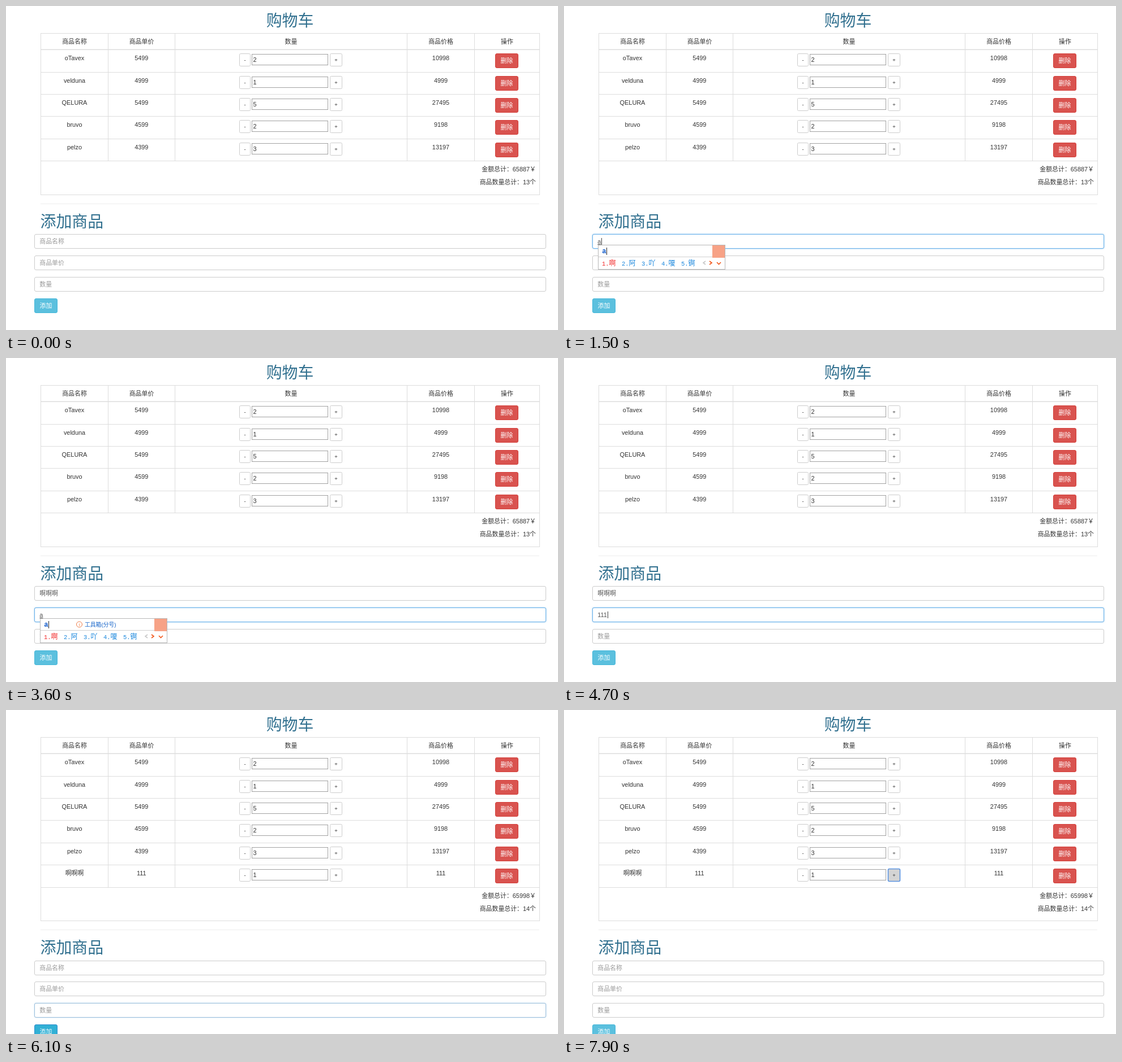
Recreate the animation shown at these times as an HTML page. Size 975 by 574 pixels, loop 8 s.

```html
<!DOCTYPE html>
<html lang="zh-CN">
<head>
<meta charset="utf-8">
<title>购物车</title>
<style>
html, body { margin: 0; width: 100%; height: 100%; overflow: hidden; background: #fff; }
svg { display: block; width: 975px; height: 574px; }
text { font-family: "Liberation Sans", "Noto Sans CJK SC", "Noto Sans CJK", sans-serif; font-size: 10.9px; fill: #333; white-space: pre; }
.colon { font-family: "Noto Sans CJK TC", "Noto Sans CJK", sans-serif; }
.glow { filter: drop-shadow(0 0 1.6px rgba(102, 175, 233, .6)); }
</style>
</head>
<body>
<svg id="stage" viewBox="0 0 975 574" xmlns="http://www.w3.org/2000/svg"></svg>
<script>
const LOOP = 8000, TOP = 77.2, ROW = 39.4;
const stage = document.getElementById('stage');
const cols = [61, 180, 298, 708, 827, 942];
const goods = [
  ['oTavex', 5499, 2], ['velduna', 4999, 1], ['QELURA', 5499, 5],
  ['bruvo', 4599, 2], ['pelzo', 4399, 3]
];
const hints = ['商品名称', '商品单价', '数量'];
const fieldY = [404.3, 442, 479.8];

// Input-method windows: right edge, letters, candidates
const one = [285, 'a', ['啊', '阿', '吖', '嗄', '锕']];
const two = [362, "a'a", ['啊啊', '嗷嗷', '阿啊', '啊', '阿']];
const three = [483, "a'a'a", ['啊啊啊', '啊啊啊啊啊啊', '啊啊啊啊', '啊啊', '啊']];
const cloud = [483, "a'a'a", ['啊啊啊', '啊啊啊啊啊啊', '啊啊啊啊啊', '啊啊啊啊', '阿阿阿']];

const start = {
  glow: [0, 0, 0], val: ['', '', ''], comp: -1, caret: null,
  pop: null, popY: 423, tip: 0, added: false, btn: '', plus: ''
};

// Time in ms and what changes then; caret is [field, x]
const steps = [
  [800, { glow: [.5, 0, 0], caret: [0, 59] }],
  [900, { glow: [1, 0, 0] }],
  [1200, { caret: null }],
  [1500, { val: ['a', '', ''], comp: 0, caret: [0, 66], pop: one }],
  [1600, { val: ["a'a", '', ''], caret: [0, 74], pop: two }],
  [1700, { val: ["a'a'a", '', ''], caret: [0, 82], pop: three }],
  [1800, { pop: cloud }],
  [2100, { val: ['啊啊啊', '', ''], comp: -1, caret: [0, 92], pop: null }],
  [2600, { caret: null }],
  [2800, { glow: [.5, .5, 0], caret: [1, 59] }],
  [2900, { glow: [0, 1, 0], val: ['啊啊啊', 'a', ''], comp: 1, caret: [1, 66], pop: one, popY: 461 }],
  [3300, { tip: .25 }],
  [3400, { tip: .5, caret: null }],
  [3500, { tip: .75 }],
  [3600, { tip: 1 }],
  [3800, { val: ['啊啊啊', '', ''], comp: -1, caret: [1, 59], pop: null, tip: 0 }],
  [4300, { caret: null }],
  [4400, { val: ['啊啊啊', '1', ''], caret: [1, 65] }],
  [4500, { val: ['啊啊啊', '11', ''], caret: [1, 71] }],
  [4700, { val: ['啊啊啊', '111', ''], caret: [1, 77] }],
  [4800, { btn: 'hover' }],
  [4900, { btn: '' }],
  [5100, { glow: [0, .5, .5], caret: [2, 59] }],
  [5200, { glow: [0, 0, 1] }],
  [5600, { val: ['啊啊啊', '111', '1'], caret: [2, 65] }],
  [5800, { btn: 'hover' }],
  [6100, { glow: [0, 0, .5], val: ['', '', ''], caret: null, added: true, btn: 'focus' }],
  [6200, { glow: [0, 0, 0] }],
  [7500, { plus: 'hover' }],
  [7900, { plus: 'focus', btn: '' }]
];

const fill = (x, y, w, h, c) => `<rect x="${x}" y="${y}" width="${w}" height="${h}" fill="${c}"/>`;
const box = (x, y, w, h, r, bg, line, more = '') =>
  `<rect x="${x + .5}" y="${y + .5}" width="${w - 1}" height="${h - 1}" rx="${r}" fill="${bg}" stroke="${line}" ${more}/>`;
const text = (x, y, s, style = '', anchor = 'start') =>
  `<text x="${x}" y="${y}" text-anchor="${anchor}" style="${style}">${s}</text>`;
const mid = (x, y, s, style) => text(x, y, s, style, 'middle');
const path = (d, c) => `<path d="${d}" fill="none" stroke="${c}" stroke-width="1.6"/>`;
const rowY = i => Math.round(TOP + ROW * i);

function row([name, price, count], i, plus) {
  const y = rowY(i);
  const [bg, line] = { '': ['#fff', '#ccc'], hover: ['#e6e6e6', '#adadad'], focus: ['#d4d4d4', '#5b93e0'] }[plus];
  const wide = plus === 'focus' ? 'stroke-width="1.6"' : '';
  return mid(121, y + 19, name) + mid(239.3, y + 19, price) +
    box(412, y + 7, 20, 23, 2, '#fff', '#ccc') + mid(422, y + 22, '-', 'font-size:9.3px') +
    box(434, y + 8, 135, 20, 0, '#fff', '#a2a2a2') + text(436.5, y + 22, count) +
    box(572, y + 7, 22, 23, 2, bg, line, wide) + mid(583, y + 22, '+', 'font-size:9.3px') +
    mid(768, y + 19, price * count) +
    box(864, y + 7, 41, 26, 2.5, '#d9534f', '#d43f3a') + mid(884.5, y + 24, '删除', 'fill:#fff');
}

const total = (y, label, value) =>
  text(936, y, `${label}<tspan class="colon">：</tspan>${value}`, '', 'end');

function table(list, plus) {
  const n = list.length, end = rowY(n), low = Math.round(TOP + ROW * n + 59.4);
  const heads = ['商品名称', '商品单价', '数量', '商品价格', '操作'];
  let out = fill(61, 48, 882, 1, '#ddd') + fill(61, 76.5, 882, 1.5, '#ddd') + fill(61, low, 882, 1, '#ddd');
  for (let i = 1; i <= n; i++) out += fill(61, rowY(i), 882, 1, '#ddd');
  cols.forEach((x, i) => {
    out += fill(x, 48, 1, (i % 5 ? end : low) - 48, '#ddd');
    if (heads[i]) out += mid((x + cols[i + 1]) / 2 + .5, 66.5, heads[i]);
  });
  list.forEach((g, i) => { out += row(g, i, i === 5 ? plus : ''); });
  const sum = list.reduce((a, g) => a + g[1] * g[2], 0);
  const count = list.reduce((a, g) => a + g[2], 0);
  return out + total(end + 19, '金额总计', `${sum}￥`) + total(end + 42, '商品数量总计', `${count}个`);
}

function form(s, dy) {
  const snap = y => Math.round(y + dy);
  let out = fill(61, snap(350), 881, 1, '#eee') + text(60.5, snap(392), '添加商品', 'font-size:27.9px;fill:#31708f');
  fieldY.forEach((fy, i) => {
    const y = snap(fy), val = s.val[i];
    out += box(50, y, 904, 26, 2.5, '#fff', '#ccc');
    if (s.glow[i]) out += box(50, y, 904, 26, 2.5, '#fff', '#66afe9', `class="glow" opacity="${s.glow[i]}"`);
    const line = s.comp === i ? ';text-decoration:underline' : '';
    out += text(59.3, y + 17, val || hints[i], `fill:${val ? '#555' : '#999'}${line}`);
    if (s.caret && s.caret[0] === i) out += fill(s.caret[1], y + 7, 1, 12, '#444');
  });
  const [bg, edge] = { '': ['#5bc0de', '#46b8da'], hover: ['#31b0d5', '#269abc'], focus: ['#31b0d5', '#2e8ece'] }[s.btn];
  const y = snap(517.6);
  return out + box(50, y, 41, 26, 2.5, bg, edge) + mid(70.5, y + 17, '添加', 'fill:#fff');
}

function popup([right, word, picks], y, tip) {
  const w = right - 60, cy = y + 32;
  let out = box(60, y, w, 44, 0, '#fff', '#b8b8b8') + fill(61, y + 21, w - 2, 1, '#d0d0d0') +
    text(67.5, y + 15, word, 'font-size:12px;font-weight:bold;fill:#0b57c9') +
    fill(75 + (word.length - 1) / 2 * 10, y + 5, 1, 13, '#222');
  let x = 67;
  picks.forEach((p, i) => {
    const c = i ? '#1a87dd' : '#f22b2b';
    out += text(x, cy + 4.5, `${i + 1}.`, `font:10.5px 'Liberation Mono',monospace;fill:${c}`) +
      text(x + 12.5, cy + 4.5, p, `font-size:12px;fill:${c}`);
    x += 23 + 12 * p.length;
  });
  out += path(`M${right - 35} ${cy - 3}l-4 3l4 3`, '#c8c8c8') +
    path(`M${right - 28} ${cy - 3}l4 3l-4 3`, '#f2581c') +
    path(`M${right - 15} ${cy - 1}l3.5 3.5l3.5 -3.5`, '#f2581c') +
    fill(right - 23, y + 1, 22, 22, '#f7a286');
  if (tip) out += `<g opacity="${tip}"><circle cx="129.5" cy="${y + 11}" r="5" fill="none" stroke="#ee7a45"/>` +
    mid(129.5, y + 14, 'i', 'font-size:8px;fill:#ee7a45') +
    text(139, y + 14.8, '工具箱(分号)', 'font-size:9.8px;fill:#1463c9') + '</g>';
  return out;
}

function draw(n) {
  const s = Object.assign({}, start, ...steps.slice(0, n).map(p => p[1]));
  const list = s.added ? [...goods, ['啊啊啊', 111, 1]] : goods;
  stage.innerHTML = mid(501.5, 36, '购物车', 'font-size:27.9px;fill:#31708f') +
    table(list, s.plus) + form(s, s.added ? ROW : 0) +
    (s.pop ? popup(s.pop, s.popY, s.tip) : '');
}

let shown = -1;
const begin = performance.now();
function tick() {
  const t = (performance.now() - begin) % LOOP;
  const n = steps.filter(p => p[0] <= t).length;
  if (n !== shown) draw(shown = n);
  requestAnimationFrame(tick);
}
tick();
</script>
</body>
</html>
```
